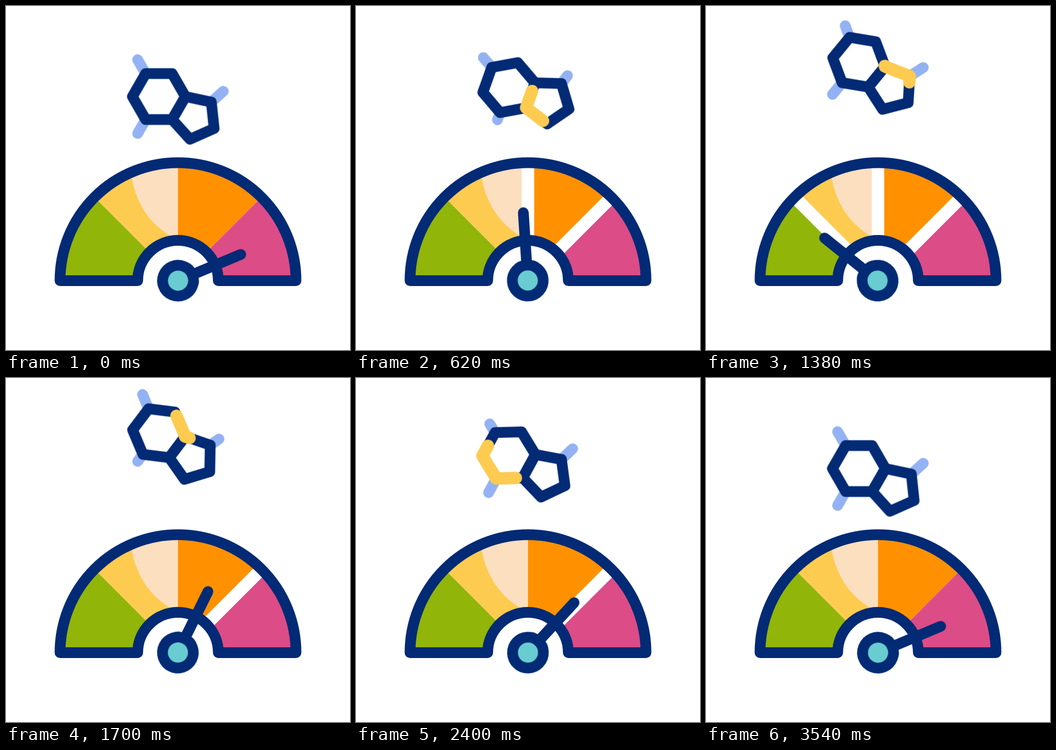
Animation, 640 px wide and 640 px high, one loop 3.6 s. Source, as an HTML page:

```html
<!DOCTYPE html>
<html lang="en">
<head>
<meta charset="utf-8">
<title>Molecule gauge</title>
<style>
@property --head { syntax: "<number>"; inherits: true; initial-value: 0; }
@property --tail { syntax: "<number>"; inherits: true; initial-value: 0; }

:root {
  --navy: #032a75;
  --ease: cubic-bezier(.37, 0, .63, 1);
  --loop: 3.6s infinite;
}
html, body { margin: 0; width: 100%; height: 100%; overflow: hidden; background: #fff; }
svg { display: block; width: 100vw; height: 100vh; fill: none; stroke-linejoin: round; }

.outline { stroke: var(--navy); stroke-width: 20; stroke-linecap: round; }
.wedges { stroke-width: 144.5; }
.gaps { stroke: #fff; stroke-width: 23; }
.gaps path { animation: var(--loop) step-end; }
.gap-left { animation-name: gap-left !important; }
.gap-mid { animation-name: gap-mid !important; }
.gap-right { animation-name: gap-right !important; }

.needle { animation: swing var(--loop) var(--ease); }
.lift { animation: lift var(--loop) var(--ease); }
.tilt { animation: tilt var(--loop) var(--ease); }

.bonds { stroke: #93b2f4; stroke-width: 20; stroke-linecap: round; }
.bonds path { stroke-dasharray: 30px 99px; }
.bond-a { animation: bond-a var(--loop) var(--ease); }
.bond-b { animation: bond-b var(--loop) var(--ease); }
.bond-c { animation: bond-c var(--loop) var(--ease); }

.trail {
  stroke: #fdcb50; stroke-width: 23; stroke-linecap: round;
  stroke-dasharray: calc((var(--head) - var(--tail)) * 1px) 200px;
  stroke-dashoffset: calc(var(--tail) * -1px);
}
.trail-pent {
  animation: pent-head var(--loop) var(--ease), pent-tail var(--loop) var(--ease), pent-show var(--loop) step-end;
}
.trail-hex {
  animation: hex-head var(--loop) var(--ease), hex-tail var(--loop) var(--ease), hex-show var(--loop) step-end;
}

@keyframes swing {
  0%, 55.56%, 98.89%, 100% { transform: rotate(67.3deg); }
  33.33% { transform: rotate(-67.3deg); }
  69.72%, 86.11% { transform: rotate(39.8deg); }
}
@keyframes gap-left { 0%, 39.26%, 100% { opacity: 0; } 24.44% { opacity: 1; } }
@keyframes gap-mid { 0%, 44.44%, 100% { opacity: 0; } 16.67% { opacity: 1; } }
@keyframes gap-right { 0%, 49.63%, 89.78%, 100% { opacity: 0; } 8.9%, 65.67% { opacity: 1; } }

@keyframes lift {
  0%, 3.89%, 83.06%, 100% { transform: translateY(0); }
  43.89% { transform: translateY(-67px); }
}
@keyframes tilt {
  0%, 3.33%, 83.33%, 100% { transform: rotate(0deg); }
  22.22% { transform: rotate(-12.4deg); }
  41.67% { transform: rotate(11deg); }
  59.17% { transform: rotate(-6.1deg); }
  75% { transform: rotate(4deg); }
}
@keyframes bond-a {
  0%, 8.33%, 44.44%, 75%, 100% { stroke-dasharray: 30px 99px; }
  30.56%, 61.11% { stroke-dasharray: 13px 99px; }
}
@keyframes bond-b {
  0%, 2.78%, 34.72%, 65.28%, 100% { stroke-dasharray: 30px 99px; }
  18.33%, 51.39% { stroke-dasharray: 14px 99px; }
}
@keyframes bond-c {
  0%, 6.94%, 37.5%, 69.44%, 100% { stroke-dasharray: 30px 99px; }
  23.06%, 54.17% { stroke-dasharray: 14px 99px; }
}

@keyframes pent-head { 0% { --head: 0; } 41.94%, 100% { --head: 100; } }
@keyframes pent-tail { 0%, 10.28% { --tail: 0; } 52.3%, 100% { --tail: 100; } }
@keyframes pent-show { 0%, 52.3%, 100% { opacity: 0; } .5% { opacity: 1; } }
@keyframes hex-head { 0%, 36.56% { --head: 0; } 79.89%, 100% { --head: 100; } }
@keyframes hex-tail { 0%, 47.28% { --tail: 0; } 90%, 100% { --tail: 100; } }
@keyframes hex-show { 0%, 90%, 100% { opacity: 0; } 36.9% { opacity: 1; } }
</style>
</head>
<body>
<svg viewBox="0 0 640 640">
  <defs>
    <path id="hex" pathLength="100" d="M49.3 0 24.65-42.7H-24.65L-49.3 0-24.65 42.7H24.65L49.3 0"/>
    <path id="pent" pathLength="100" d="M49.3 0 24.65 42.7 57.7 79.3 102.7 59.3 97.5 10.2 49.3 0"/>
  </defs>

  <g transform="translate(320 511)">
    <g class="wedges">
      <path stroke="#91b508" d="M-147.25 0A147.25 147.25 0 0 1-104.1-104.1"/>
      <path stroke="#fdcb50" d="M-104.1-104.1A147.25 147.25 0 0 1 0-147.25"/>
      <path stroke="#ff9100" d="M0-147.25A147.25 147.25 0 0 1 104.1-104.1"/>
      <path stroke="#dc4c86" d="M104.1-104.1A147.25 147.25 0 0 1 147.25 0"/>
    </g>
    <path fill="#fcdfbf" d="M-87-195Q-74-118-12-82L0-78V-215Q-46-215-87-195Z"/>
    <g class="gaps">
      <path class="gap-left" d="M-54-54-153-153"/>
      <path class="gap-mid" d="M0-76V-216"/>
      <path class="gap-right" d="M54-54 153-153"/>
    </g>
    <path class="outline" d="M-219.5 0A219.5 219.5 0 0 1 219.5 0H75A75 75 0 0 0-75 0Z"/>
  </g>

  <g transform="translate(319.6 511.2)">
    <g class="needle">
      <path class="outline" d="M0-30V-127"/>
      <circle class="outline" cy="-.45" r="28.7" fill="#68ccd1"/>
    </g>
  </g>

  <g transform="translate(284.5 168.5)">
    <g class="lift">
      <g class="tilt">
        <g class="bonds">
          <path class="bond-a" d="M-24.65-42.7l-15-26"/>
          <path class="bond-b" d="M-24.65 42.7l-15 26"/>
          <path class="bond-c" d="M97.5 10.2l22.3-20.1"/>
        </g>
        <g class="outline">
          <use href="#hex"/>
          <use href="#pent"/>
        </g>
        <use class="trail trail-pent" href="#pent"/>
        <use class="trail trail-hex" href="#hex"/>
      </g>
    </g>
  </g>
</svg>
</body>
</html>
```
